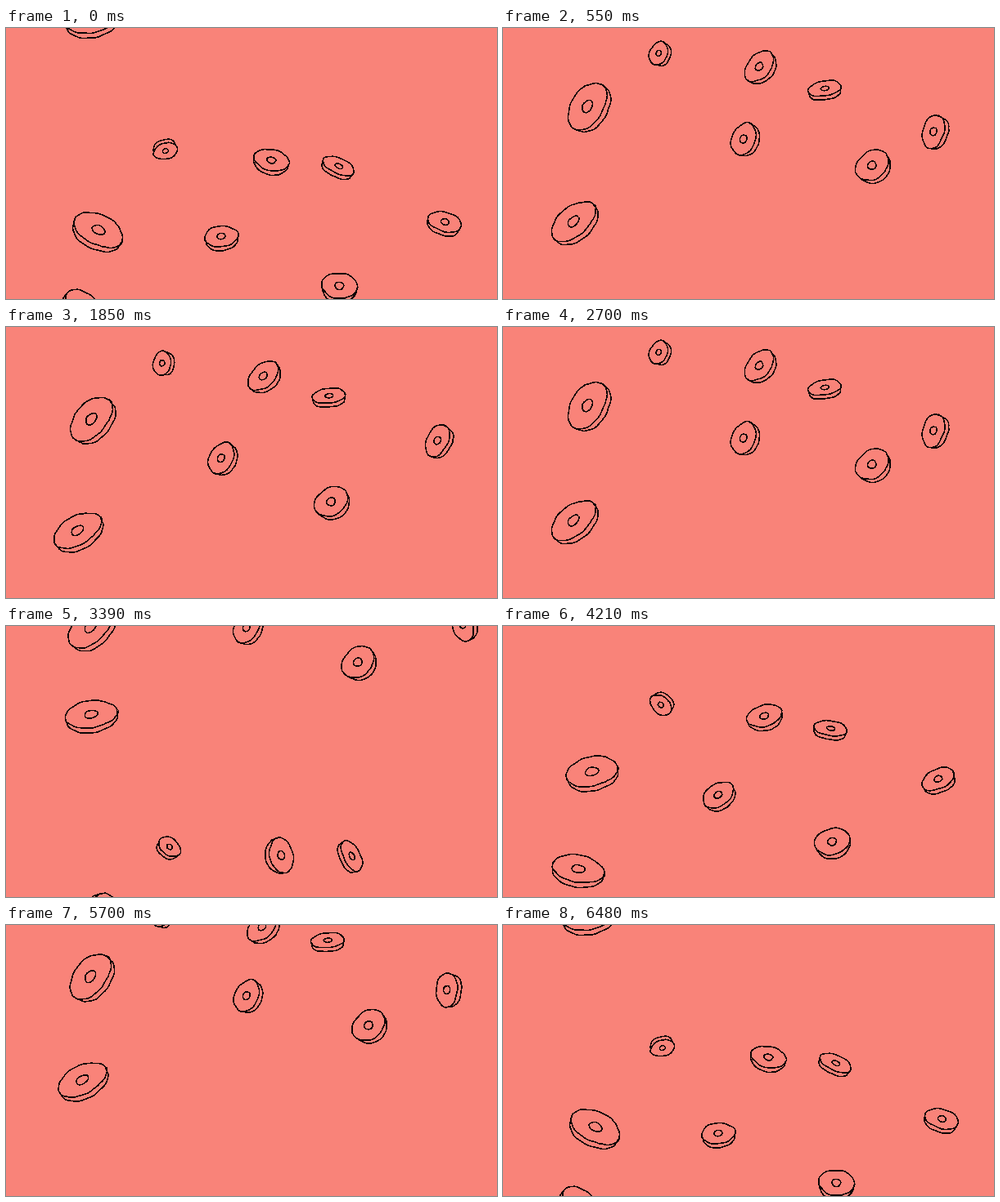
An HTML page that plays this animation: 600 px wide and 332 px high, repeating every 6510 ms.

```html
<!DOCTYPE html>
<html lang="en">
<head>
<meta charset="utf-8">
<title>Falling discs</title>
<style>
  html, body { margin: 0; width: 100%; height: 100%; overflow: hidden; background: #f98379; }
  svg { display: block; width: 100vw; height: 100vh; }
  path { fill: none; stroke: #0c0505; stroke-width: 1.6; stroke-linejoin: round; shape-rendering: crispEdges; }
</style>
</head>
<body>
<svg viewBox="0 0 600 332" id="stage"></svg>
<script>
const LOOP = 6510, CYCLE = 1080, REST_END = 0.58;
const FALL = 358;      // distance from one resting place round to the same place again
const MOVING = 0.91;   // share of a cycle spent falling

// Ease curve through [time, progress, slope].
const EASE = [[0, 0, 0], [0.133, 0.037, 0.5], [0.42, 0.333, 1.8], [0.559, 0.667, 1.9], [MOVING, 1, 0]];

const stage = document.getElementById('stage');
const discs = [];

function disc(x, y, radius, options) {
  const newPath = () => stage.appendChild(document.createElementNS('http://www.w3.org/2000/svg', 'path'));
  discs.push({
    x, y, radius,
    squash: 0.62,       // minor over major radius
    angle: 0,           // at rest
    spin: 60, drift: 0, // change of angle and x per third of the fall
    settle: 10, sway: 0, // angle and x still to go on coming in
    lead: 0,            // how far ahead of the others in mid-fall
    hopX: 0, hopY: 0,   // jump on leaving the resting place
    seed: discs.length * 1.9,
    leaving: newPath(), entering: newPath(),
    ...options
  });
}

disc(103, 96, 32, { angle: -58, spin: 66, drift: 8, settle: 21, lead: 0.04 });
disc(190, 31, 15, { angle: -68, spin: -127, drift: 5, squash: 0.72 });
disc(313, 47, 22, { angle: -50, spin: 65, drift: 12, lead: -0.008, squash: 0.65 });
disc(393, 74, 20.5, { angle: -10, spin: 42, drift: 17, lead: -0.042, squash: 0.5 });
disc(294, 136, 20.5, { angle: -68, spin: 70, lead: -0.022, squash: 0.7, hopX: -31, hopY: 13 });
disc(451, 168, 22, { angle: -38, spin: 45, drift: 12, settle: -6, sway: -21, lead: -0.008, squash: 0.8, hopX: -55, hopY: 33 });
disc(526, 127, 21, { angle: -75, spin: 98, drift: 11, settle: -30, sway: 32, lead: -0.015 });
disc(86, 237, 32, { angle: -40, spin: 100, drift: 12, settle: 32, sway: 18, lead: -0.015, squash: 0.58 });

function ease(t) {
  if (t >= MOVING) return 1;
  const i = EASE.findIndex(key => t < key[0]) - 1;
  const [t0, p0, m0] = EASE[i], [t1, p1, m1] = EASE[i + 1];
  const h = t1 - t0, u = (t - t0) / h, v = 1 - u;
  return v * v * (1 + 2 * u) * p0 + u * u * (3 - 2 * u) * p1
    + h * u * v * (v * m0 - u * m1);
}

function progressOf(d, phase) {
  if (phase >= MOVING) return 1;
  return ease(Math.max(0, phase + d.lead * Math.sin(Math.PI * phase / MOVING)));
}

// An uneven line round an ellipse, with a little pen jitter.
function sketchArc(rx, ry, from, to, seed, shiftY = 0) {
  const count = Math.max(10, Math.ceil((to - from) * rx / 3));
  const points = [];
  for (let i = 0; i <= count; i++) {
    const a = from + (to - from) * i / count;
    const bend = 1 + 0.02 * Math.sin(3 * a + seed) + 0.015 * Math.sin(4 * a + 2 * seed);
    const jitter = 0.35 * Math.sin(Math.round(a * rx) * 2.4 + seed);
    points.push([(rx * bend + jitter) * Math.cos(a), (ry * bend + jitter) * Math.sin(a) + shiftY]);
  }
  return points;
}

const line = points => 'M' + points.map(p => p.map(n => n.toFixed(2)).join(' ')).join('L');

function draw(path, d, x, y, angle) {
  const { radius, seed } = d;
  const upright = Math.abs(Math.sin(angle * Math.PI / 180));
  const minor = radius * d.squash * (0.87 + 0.13 * upright);
  const depth = 3 + radius * 0.1;
  const side = sketchArc(radius * 0.95, minor, 0.1, Math.PI - 0.1, seed, depth);
  path.setAttribute('transform', `translate(${x} ${y}) rotate(${angle})`);
  path.setAttribute('d',
    line(sketchArc(radius, minor, 0, Math.PI * 2, seed))
    + line([[radius, 0], ...side, [-radius, 0]])
    + line(sketchArc(radius * 0.25, minor * 0.3, 0, Math.PI * 2, seed + 1)));
}

function render(time) {
  const phase = ((time % LOOP) / CYCLE - REST_END + 1) % 1;
  for (const d of discs) {
    const progress = progressOf(d, phase);
    const gone = progress * 3, left = (1 - progress) * 3, near = Math.min(1, left);
    draw(d.leaving, d, d.x + d.hopX + d.drift * gone, d.y + d.hopY + FALL * progress, d.angle + d.spin * gone);
    draw(d.entering, d, d.x + d.sway * near, d.y - FALL * (1 - progress), d.angle + d.settle * near);
    // At rest only the disc that has come in is shown.
    d.leaving.style.display = progress < 1 ? '' : 'none';
  }
}

const start = performance.now();
function tick() {
  render(performance.now() - start);
  requestAnimationFrame(tick);
}
tick();
</script>
</body>
</html>
```
